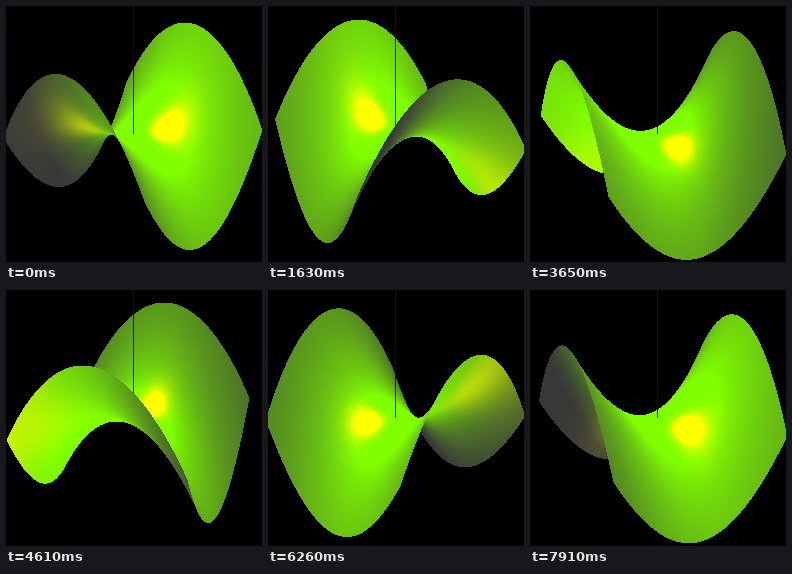
Animation of 256x256 px, one loop 8000 ms. Source, as an HTML page with a canvas:

```html
<!DOCTYPE html>
<html lang="en">
<head>
<meta charset="utf-8">
<title>Rotating saddle</title>
<style>
  html, body { margin: 0; width: 100%; height: 100%; overflow: hidden; background: #000; }
  canvas { display: block; width: 256px; height: 256px; image-rendering: pixelated; }
</style>
</head>
<body>
<canvas id="stage" width="256" height="256"></canvas>
<script>
const SIZE = 256, CENTER = 127.5, AXIS_X = 127, LOOP = 8000;
const FOCAL = 844, DISTANCE = 9.19;
const SIN = Math.sqrt(0.2), COS = 2 * SIN; // camera elevation, tan = 1/2

const SHADE = [56, 56, 56], LIT = [127, 255, 0], GLOSS = [255, 255, 0], AXIS = [18, 18, 28];

const unit = v => { const n = Math.hypot(...v); return v.map(c => c / n); };
const dot = (a, b) => a[0] * b[0] + a[1] * b[1] + a[2] * b[2];
const clamp = v => Math.min(1, Math.max(0, v));
const mix = (a, b, k) => a.map((c, i) => c + (b[i] - c) * k);

// One light above and one below, both fixed to the surface
const TOP = { dir: unit([0.06, -0.12, 0.99]), diffuse: 1.4, gloss: 2.6, power: 45 };
const BOTTOM = { dir: unit([-0.42, 0.2, -0.88]), diffuse: 1.2, gloss: 0.55, power: 32 };

const ctx = document.getElementById('stage').getContext('2d');
const image = ctx.createImageData(SIZE, SIZE);

function shade(x, y, ray) {
  const view = unit(ray.map(c => -c));
  let normal = unit([2 * x, -2 * y, 1]);
  const light = dot(normal, view) > 0 ? TOP : BOTTOM;
  if (light === BOTTOM) normal = normal.map(c => -c);
  const half = unit(view.map((c, i) => c + light.dir[i]));
  const diffuse = clamp(light.diffuse * dot(normal, light.dir));
  const gloss = clamp(light.gloss * Math.max(0, dot(normal, half)) ** light.power);
  return mix(mix(SHADE, LIT, diffuse), GLOSS, gloss);
}

// Nearest crossing of the ray with z = y² - x² inside the unit square
function hitSaddle(eye, ray) {
  const a = ray[1] ** 2 - ray[0] ** 2;
  const b = 2 * (eye[1] * ray[1] - eye[0] * ray[0]) - ray[2];
  const c = eye[1] ** 2 - eye[0] ** 2 - eye[2];
  const disc = b * b - 4 * a * c;
  if (disc < 0) return Infinity;
  const q = -(b + (b < 0 ? -1 : 1) * Math.sqrt(disc)) / 2;
  let nearest = Infinity;
  for (const t of [q / a, c / q]) {
    const inside = Math.abs(eye[0] + t * ray[0]) <= 1 && Math.abs(eye[1] + t * ray[1]) <= 1;
    if (t > 0 && t < nearest && inside) nearest = t;
  }
  return nearest;
}

function draw(angle) {
  const ca = Math.cos(angle), sa = Math.sin(angle);
  const toObject = (w, d, z) => [w * ca + d * sa, d * ca - w * sa, z];
  const eye = toObject(0, -DISTANCE * COS, DISTANCE * SIN);
  for (let py = 0; py < SIZE; py++) {
    const dy = (CENTER - py) / FOCAL;
    const depth = COS + dy * SIN;
    for (let px = 0; px < SIZE; px++) {
      const ray = toObject((px - CENTER) / FOCAL, depth, dy * COS - SIN);
      const t = hitSaddle(eye, ray);
      const onAxis = px === AXIS_X && py <= CENTER && DISTANCE * COS / depth <= t + 0.02;
      let color = [0, 0, 0];
      if (onAxis) color = AXIS;
      else if (t < Infinity) color = shade(eye[0] + t * ray[0], eye[1] + t * ray[1], ray);
      image.data.set([...color, 255], 4 * (py * SIZE + px));
    }
  }
  ctx.putImageData(image, 0, 0);
}

// The turn advances in steps; each group of seven has its own pace
const GROUPS = [110, 940, 1750, 2570, 3410, 4250, 5080, 5910, 6720, 7550, 8390];

function stepAt(time) {
  if (time < GROUPS[0]) return 0;
  const g = GROUPS.findIndex((start, i) => time >= start && time < GROUPS[i + 1]);
  const pace = (GROUPS[g + 1] - GROUPS[g]) / 7;
  return 1 + 7 * g + Math.min(6, Math.floor((time - GROUPS[g]) / pace + 0.05));
}

let shown = -1;
function tick() {
  const step = stepAt(performance.now() % LOOP);
  if (step !== shown) {
    shown = step;
    draw((29.7 + 5.055 * (step - 14)) * Math.PI / 180);
  }
  requestAnimationFrame(tick);
}
tick();
</script>
</body>
</html>
```
